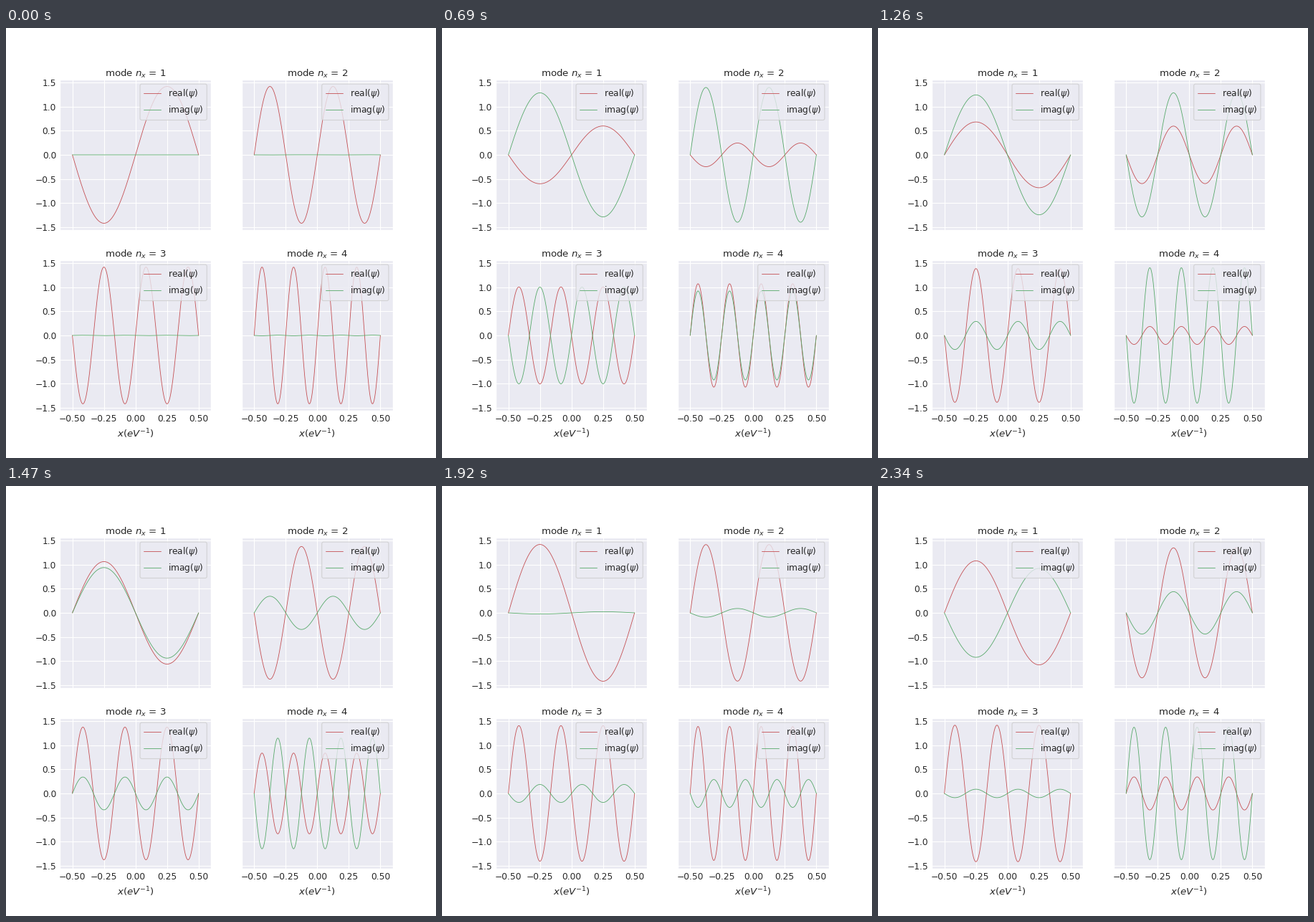
These frames come from a looping animation (600x600 px, 2370 ms). A matplotlib script:

```python
import numpy as np
import matplotlib.pyplot as plt
from matplotlib.animation import FuncAnimation
from matplotlib.lines import Line2D
from matplotlib.patches import FancyBboxPatch
from matplotlib.transforms import IdentityTransform

FRAMES = 79
INTERVAL = 30
DT = 0.0025        # simulated time per frame
LAG = 1.5e-5       # imaginary part runs a fraction of a step ahead
DX = 1 / 200
RED, GREEN, PANEL, INK = "#c44e52", "#55a868", "#eaeaf2", "#262626"
CURVE_WIDTH = 0.6
SMALL, LARGE = 8.8, 9.6

plt.rcParams.update({
    "font.family": "DejaVu Sans",
    "text.color": INK,
    "axes.labelcolor": INK,
    "xtick.color": INK,
    "ytick.color": INK,
    "axes.facecolor": PANEL,
    "axes.edgecolor": "white",
    "axes.axisbelow": True,
    "lines.solid_capstyle": "round",
})

fig, axes = plt.subplots(2, 2, figsize=(6, 6), dpi=100, sharex=True, sharey=True)
fig.subplots_adjust(left=0.125, right=0.9, bottom=0.11, top=0.88,
                    wspace=0.2, hspace=0.2)
x = np.linspace(-0.5, 0.5, 201)
pixels = IdentityTransform()


def add_legend(ax):
    """Two-row legend placed in pixels from the panel's top right corner."""
    corner = ax.get_position()
    right, top = corner.x1 * 600, corner.y1 * 600
    box_w, box_h, gap = 93.2, 50.4, 6.1
    left = right - gap - box_w
    fig.add_artist(FancyBboxPatch(
        (left, top - gap - box_h), box_w, box_h,
        boxstyle="round,pad=0,rounding_size=2.4", transform=pixels,
        facecolor=PANEL, edgecolor="0.8", alpha=0.8, linewidth=0.8, zorder=4))
    for row, (name, color) in enumerate((("real", RED), ("imag", GREEN))):
        y = top - 19 - 23 * row
        fig.add_artist(Line2D([left + 4.9, left + 29.3], [y, y], color=color,
                              linewidth=CURVE_WIDTH, transform=pixels, zorder=5))
        fig.text(left + 39.1, y - 4.3, name + r"($\psi$)", fontsize=SMALL,
                 transform=pixels, va="baseline", zorder=5)


def make_panel(ax, n):
    ax.set_xlim(-0.6, 0.6)
    ax.set_ylim(-1.1 * np.sqrt(2), 1.1 * np.sqrt(2))
    ax.set_xticks(np.arange(-0.5, 0.51, 0.25))
    ax.set_yticks(np.arange(-1.5, 1.51, 0.5))
    ax.tick_params(length=0, pad=3.5, labelsize=SMALL)
    ax.grid(color="white", linewidth=0.8)
    for spine in ax.spines.values():
        spine.set_linewidth(1)
    ax.set_title(f"mode $n_x$ = {n}", fontsize=LARGE, pad=3)
    if n > 2:
        ax.set_xlabel("$x (eV^{-1})$", fontsize=LARGE)
    add_legend(ax)
    real, = ax.plot([], [], color=RED, linewidth=CURVE_WIDTH)
    imag, = ax.plot([], [], color=GREEN, linewidth=CURVE_WIDTH)
    wave_number = 2 * np.pi * n
    shape = np.sqrt(2) * np.sin(wave_number * x)
    energy = (1 - np.cos(wave_number * DX)) / DX**2   # energy on the discrete grid
    return real, imag, shape, energy


panels = [make_panel(ax, n) for n, ax in enumerate(axes.flat, 1)]


def update(frame):
    t = frame * DT
    for real, imag, shape, energy in panels:
        real.set_data(x, shape * np.cos(energy * t))
        imag.set_data(x, -shape * np.sin(energy * (t + LAG)))
    return [line for panel in panels for line in panel[:2]]


anim = FuncAnimation(fig, update, frames=FRAMES, interval=INTERVAL,
                     repeat=True, repeat_delay=0, blit=False)
plt.show()
```
